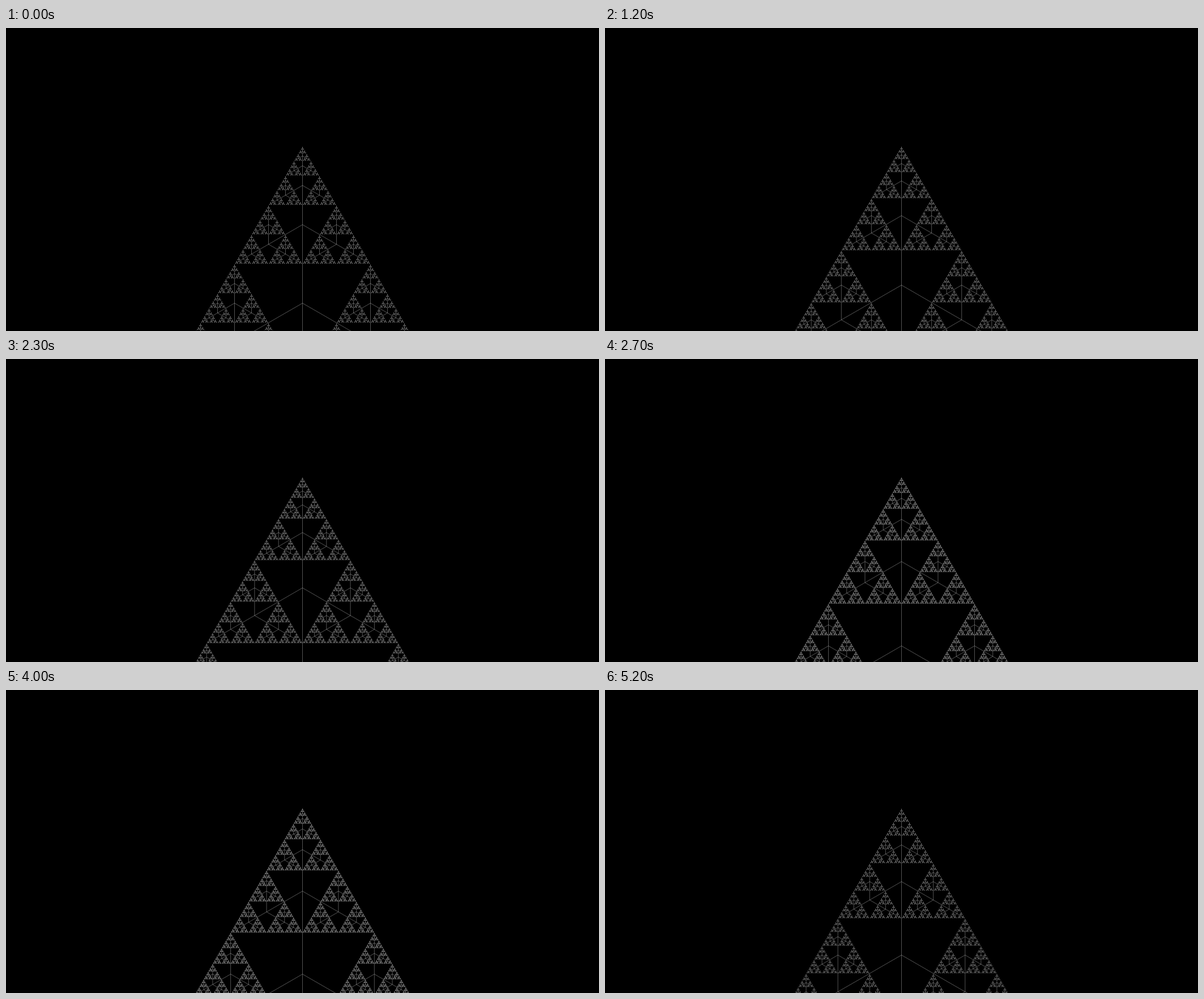
Write an HTML page with a canvas that moves like this. It is 1047 px wide and 535 px high and loops after 5.3 s.

```html
<!DOCTYPE html>
<html lang="en">
<head>
<meta charset="utf-8">
<title>Fractal zoom</title>
<style>
html, body { margin: 0; width: 100%; height: 100%; overflow: hidden; background: #000; }
canvas { display: block; }
</style>
</head>
<body>
<canvas id="stage" width="1047" height="535"></canvas>
<script>
const W = 1047, H = 535;
const STEP = 100, STEPS = 53;
const APEX = { x: W / 2, y: 208.7 };
const LEAF = 480 / Math.sqrt(3) / 256;   // longest twig before it splits
const RATE = Math.log2(1 / 0.9);         // doublings per step
const LEVELS = 11;
const COS30 = Math.sqrt(3) / 2;

const ctx = document.getElementById('stage').getContext('2d');
ctx.strokeStyle = '#fff';
ctx.lineWidth = 0.33;

function line(x1, y1, x2, y2) {
  ctx.beginPath();
  ctx.moveTo(x1, y1);
  ctx.lineTo(x2, y2);
  ctx.stroke();
}

// Three arms at 120 degrees, each ending in a half-size copy.
function star(x, y, radius, level) {
  if (level === 0 || y - radius > H) return;
  const arm = radius / 2;
  const dx = arm * COS30, dy = arm / 2;
  const tips = [[x, y - arm], [x - dx, y + dy], [x + dx, y + dy]];
  for (const [tx, ty] of tips) {
    line(x, y, tx, ty);
    star(tx, ty, arm, level - 1);
  }
}

function draw(step) {
  ctx.fillStyle = '#000';
  ctx.fillRect(0, 0, W, H);
  const phase = (step * RATE) % 1 || 1;
  const radius = LEAF * 2 ** (phase - 1 + LEVELS);
  star(APEX.x, APEX.y + radius, radius, LEVELS);
}

const start = performance.now();
let shown = -1;

function tick() {
  const step = Math.floor((performance.now() - start) / STEP) % STEPS;
  if (step !== shown) draw(shown = step);
  requestAnimationFrame(tick);
}
tick();
</script>
</body>
</html>
```
